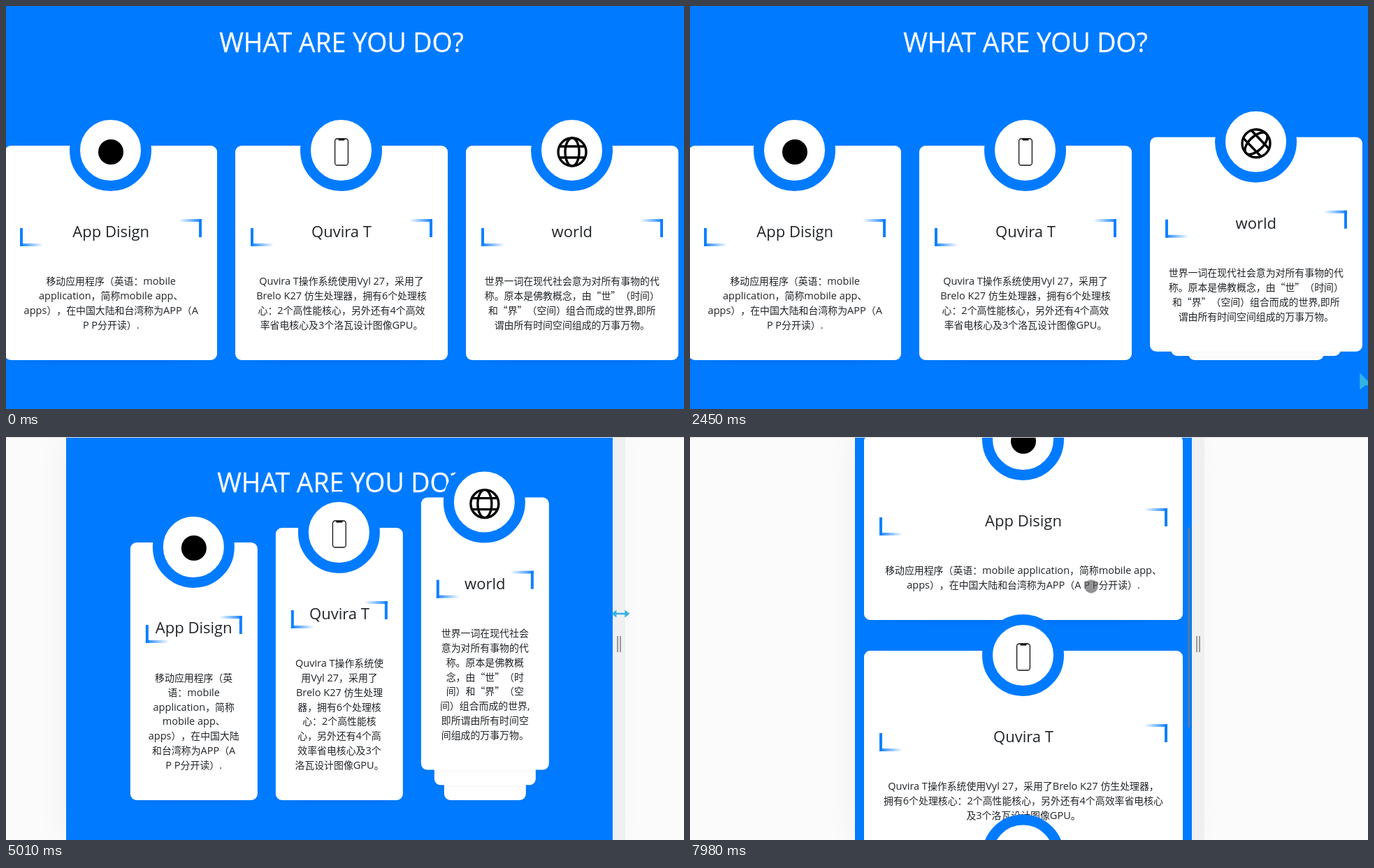
An HTML page that plays this animation: 970x577 px, repeating every 8000 ms.

```html
<!DOCTYPE html>
<html lang="zh-CN">
<head>
<meta charset="utf-8">
<title>What are you do?</title>
<style>
  html, body { margin: 0; width: 100%; height: 100%; overflow: hidden; }
  #stage { position: relative; width: 970px; height: 577px; overflow: hidden; background: #fbfbfb; }
  #stage div, #stage svg { position: absolute; }
  #page { bottom: 0; overflow: hidden; background: #007bff; box-shadow: 0 0 44px rgba(0, 0, 0, .05); }
  #content { top: 0; left: 0; width: 970px; height: 577px; }
  #heading { top: 44.5px; width: 600px; text-align: center; color: #fff; white-space: nowrap;
    font: 37.4px/40px "Open Sans", "Noto Sans", sans-serif; -webkit-text-stroke: .3px #fff; }
  #topline { left: 0; top: 0; width: 100%; height: 1px; background: #dcdcdc; }
  #strip { top: 1px; bottom: 0; width: 18px; background: #f0f0f0; }
  #strip::before { content: ""; position: absolute; left: 6px; top: 284px; width: 2px; height: 23px;
    border: solid #9a9a9a; border-width: 0 2px; }
  #thumb { width: 4px; height: 287px; border-radius: 2px; background: rgba(120, 125, 130, .55); }

  .layer, .front { left: 0; right: 0; bottom: 0; background: #fff; border-radius: 9px;
    box-shadow: 0 3px 10px rgba(0, 30, 90, .03); }
  .layer { height: 120px; }
  .far { left: 18%; right: 18%; }
  .mid { left: 10%; right: 10%; }
  .front { top: 0; }
  .ring { left: 50%; top: -52px; width: 87px; height: 87px; margin-left: -59px;
    border: 15.5px solid #007bff; border-radius: 50%; background: #fff; }
  .ring svg { left: 20px; top: 21.5px; width: 48px; height: 48px; }
  .name { left: 0; right: 0; top: 106.5px; text-align: center; color: #212529; white-space: nowrap;
    font: 22px/30px "Open Sans", "Noto Sans", sans-serif; }
  .corner { width: 33px; height: 26px; }
  .corner::before, .corner::after { content: ""; position: absolute; background: #0f80ff; }
  .corner::before { left: 0; top: 0; width: 4px; height: 26px; }
  .corner::after { left: 0; bottom: 0; width: 33px; height: 4px;
    background: linear-gradient(90deg, #0f80ff, rgba(15, 128, 255, 0)); }
  .bl { left: 22px; top: 118px; }
  .tr { right: 22px; top: 105px; transform: rotate(180deg); }
  .text { left: 0; right: 0; top: 183px; color: #212529; text-align: center; white-space: nowrap;
    text-spacing-trim: space-all;
    font: 13.9px/20.83px "Noto Sans CJK SC", "Noto Sans CJK", sans-serif; }
  .text p { margin: 0; height: 20.83px; }
  .text b { font: 400 14.5px/0 "Open Sans", "Noto Sans", sans-serif; }

  #cursor { left: 0; top: 0; width: 40px; height: 40px; overflow: visible; fill: #33b3e3; }
  #cursor #touch { fill: rgba(80, 80, 85, .62); stroke: rgba(120, 120, 125, .45); stroke-width: 2; }
</style>
</head>
<body>
<div id="stage">
  <div id="page">
    <div id="content"><div id="heading">WHAT ARE YOU DO?</div></div>
    <div id="thumb"></div>
  </div>
  <div id="strip"></div>
  <div id="topline"></div>
  <svg id="cursor">
    <path id="hand" d="M-2 2Q0-2 2 2L4 11L8 11L12 13Q14 15 13 21L11 25L11 29L-2 29L-3 25L-9 18Q-9 14-5 16L-2 18Z"/>
    <path id="arrow" d="M0 0L17 17L8 18L0 24Z"/>
    <path id="resize" d="M-13 0L-6-5.5V-1.3H6V-5.5L13 0L6 5.5V1.3H-6V5.5Z"/>
    <circle id="touch" r="9"/>
  </svg>
</div>
<script>
const LOOP = 8000, CUT = 2650, SCROLL_START = 7440;
const GUTTER = 26, LINE = 20.83, LIFT = 43.4, PITCH = 330, BASE = 520;
const $ = id => document.getElementById(id);

// [n] marks a line break used by the layouts whose digits it holds
const cards = [
  {
    name: 'App Disign', hover: [],
    icon: '<circle r="18"/>',
    text: '移动应用程序（英[2]语：mobile [012]application，简称[2]mobile [1]app、[023]apps），在中国大陆[2]和台[1]湾称为APP（A [02]P P分开读）.'
  },
  {
    name: 'Quvira T', hover: [[150, 1], [875, 0]],
    icon: '<g fill="none" stroke="#111" stroke-width="1.3"><rect x="-9.4" y="-19" width="18.8" height="38" rx="3.5"/></g><path d="M-5-19H5L4-16.5H-4Z"/>',
    text: 'Quvira T操作系统使[2]用Vyl [1]27，采用了[02]Brelo K27 仿生处[1]理[2]器，[3]拥有6个处理核[02]心：2个高[1]性能核[2]心，另外还有4个高[2]效[0]率[1]省电核心[3]及3个[2]洛瓦设计图像[1]GPU。'
  },
  {
    name: 'world', hover: [[890, 1], [2025, 0], [3195, 1]],
    icon: '<g fill="none" stroke="#000" stroke-width="3.4"><circle r="20"/><ellipse rx="10" ry="20"/><path d="M-18-8H18M-18 8H18"/></g>',
    text: '世界一词在现代社会[2]意为对所有[1]事物的代[02]称。原本是佛教概[2]念，[13]由“世”（时[2]间）[0]和“界”（空[12]间）组合而成的世界,[2]即所[0]谓由所[13]有时间空[2]间组成的万事万物。'
  }
];

const leftEdge = [[4550, -3], [5010, 86], [5400, 147], [5470, 147], [5700, 165], [5870, 165],
  [6110, 194], [6280, 194], [6680, 226], [6830, 226], [7060, 236]];
const pointer = [[70, 470, 533], [150, 470, 507], [300, 478, 430], [700, 560, 390], [890, 657, 365],
  [1250, 790, 335], [1450, 803, 325], [1750, 830, 400], [2025, 880, 507], [2450, 958, 525], [2600, 985, 560],
  [2700, 900, 577], [3195, 800, 520], [3500, 860, 300], [3700, 963, 264], [4000, 963, 264],
  [4550, 968.5, 264], [5010, 879, 253], [7060, 730, 259]];
const scrolling = [[SCROLL_START, 0], [7980, 258]];

function track(steps, t, column = 1) {
  const next = steps.findIndex(step => step[0] > t);
  if (next === 0) return steps[0][column];
  if (next < 0) return steps[steps.length - 1][column];
  const a = steps[next - 1], b = steps[next];
  return a[column] + (b[column] - a[column]) * (t - a[0]) / (b[0] - a[0]);
}

// cubic-bezier(.25, .1, .25, 1)
function ease(x) {
  if (x <= 0) return 0;
  if (x >= 1) return 1;
  const curve = (s, p, q) => 3 * p * s * (1 - s) ** 2 + 3 * q * s * s * (1 - s) + s ** 3;
  let low = 0, high = 1;
  for (let i = 0; i < 24; i++) {
    const middle = (low + high) / 2;
    if (curve(middle, .25, .25) < x) low = middle; else high = middle;
  }
  return curve(low, .1, 1);
}

function transition(events, t, duration) {
  let value = 0;
  events.forEach(([start, goal], i) => {
    if (t < start) return;
    const end = Math.min(t, i + 1 < events.length ? events[i + 1][0] : t);
    value += (goal - value) * ease((end - start) / duration);
  });
  return value;
}

function linesFor(text, layout) {
  return text.replace(/\[(\d+)\]/g, (_, set) => set.includes(layout) ? '\n' : '').split('\n');
}

function setText(card, layout) {
  if (card.layout === layout) return;
  card.layout = layout;
  const lines = linesFor(card.text, layout);
  card.height = 223.3 + LINE * lines.length;
  card.body.innerHTML = lines
    .map(line => `<p>${line.trim().replace(/[!-~][ -~]*/g, '<b>$&</b>')}</p>`).join('');
}

for (const card of cards) {
  const box = document.createElement('div');
  box.innerHTML = `<div class="layer far"></div><div class="layer mid"></div>
    <div class="front">
      <div class="ring"><svg viewBox="-24 -24 48 48">${card.icon}</svg></div>
      <div class="corner bl"></div><div class="corner tr"></div>
      <div class="name">${card.name}</div><div class="text"></div>
    </div>`;
  $('content').append(box);
  card.box = box;
  card.mid = box.querySelector('.mid');
  card.front = box.querySelector('.front');
  card.svg = box.querySelector('svg');
  card.body = box.querySelector('.text');
}

function pageState(t) {
  if (t < CUT) return { left: -40, width: 1050, center: 480, shift: -13, layout: 0, cardWidth: 303.8 };
  const left = track(leftEdge, t), center = 477, width = 2 * (center - left);
  const state = { left, width, center, shift: 0 };
  if (width > 861) return { ...state, layout: 1, cardWidth: 251.7 };
  if (width > 667) return { ...state, layout: 2, cardWidth: 182.3 };
  return { ...state, layout: 3, cardWidth: width > 500 ? 443 : width - GUTTER };
}

function drawCursor(t, right) {
  const kind = t < 70 ? '' : t < 2025 ? 'hand' : t < 3195 ? 'arrow' : t < 3550 ? 'hand' :
    t < SCROLL_START ? 'resize' : 'touch';
  for (const id of ['hand', 'arrow', 'resize', 'touch']) $(id).style.display = id === kind ? '' : 'none';
  let x = track(pointer, t, 1), y = track(pointer, t, 2);
  if (t > 4550) x = right + 11.5;
  if (kind === 'touch') {
    x = 574;
    y = 472 - track(scrolling, t);
  }
  $('cursor').style.transform = `translate(${x}px, ${y}px)`;
}

function render(t) {
  const { left, width, center, shift, layout, cardWidth } = pageState(t);
  const framed = t >= CUT, scroll = track(scrolling, t), right = left + width;

  Object.assign($('page').style, { left: left + 'px', width: width + 'px', top: '0px' });
  $('content').style.transform = `translate(${-left}px, ${shift - scroll}px)`;
  $('heading').style.left = center - 300 + 'px';
  $('strip').style.left = right + 'px';
  $('strip').style.display = $('topline').style.display = framed ? '' : 'none';
  Object.assign($('thumb').style, {
    display: t > SCROLL_START ? '' : 'none', left: width - 6 + 'px', top: 1 + scroll * .497 + 'px'
  });

  cards.forEach((card, i) => {
    setText(card, layout);
    const stacked = layout === 3;
    const x = center - cardWidth / 2 + (stacked ? 0 : (i - 1) * (cardWidth + GUTTER));
    const bottom = BASE + (stacked ? i * PITCH : 0);
    Object.assign(card.box.style, {
      left: x + 'px', top: bottom - card.height + 'px', width: cardWidth + 'px', height: card.height + 'px'
    });
    const lift = LIFT * transition(card.hover, t, 1000);
    card.front.style.transform = `translateY(${-lift}px)`;
    card.mid.style.transform = `translateY(${-lift / 2}px)`;
    card.svg.style.transform = `rotate(${-360 * transition(card.hover, t, 1170)}deg)`;
  });
  drawCursor(t, right);
}

const began = performance.now();
function tick() {
  render((performance.now() - began) % LOOP);
  requestAnimationFrame(tick);
}
tick();
</script>
</body>
</html>
```
